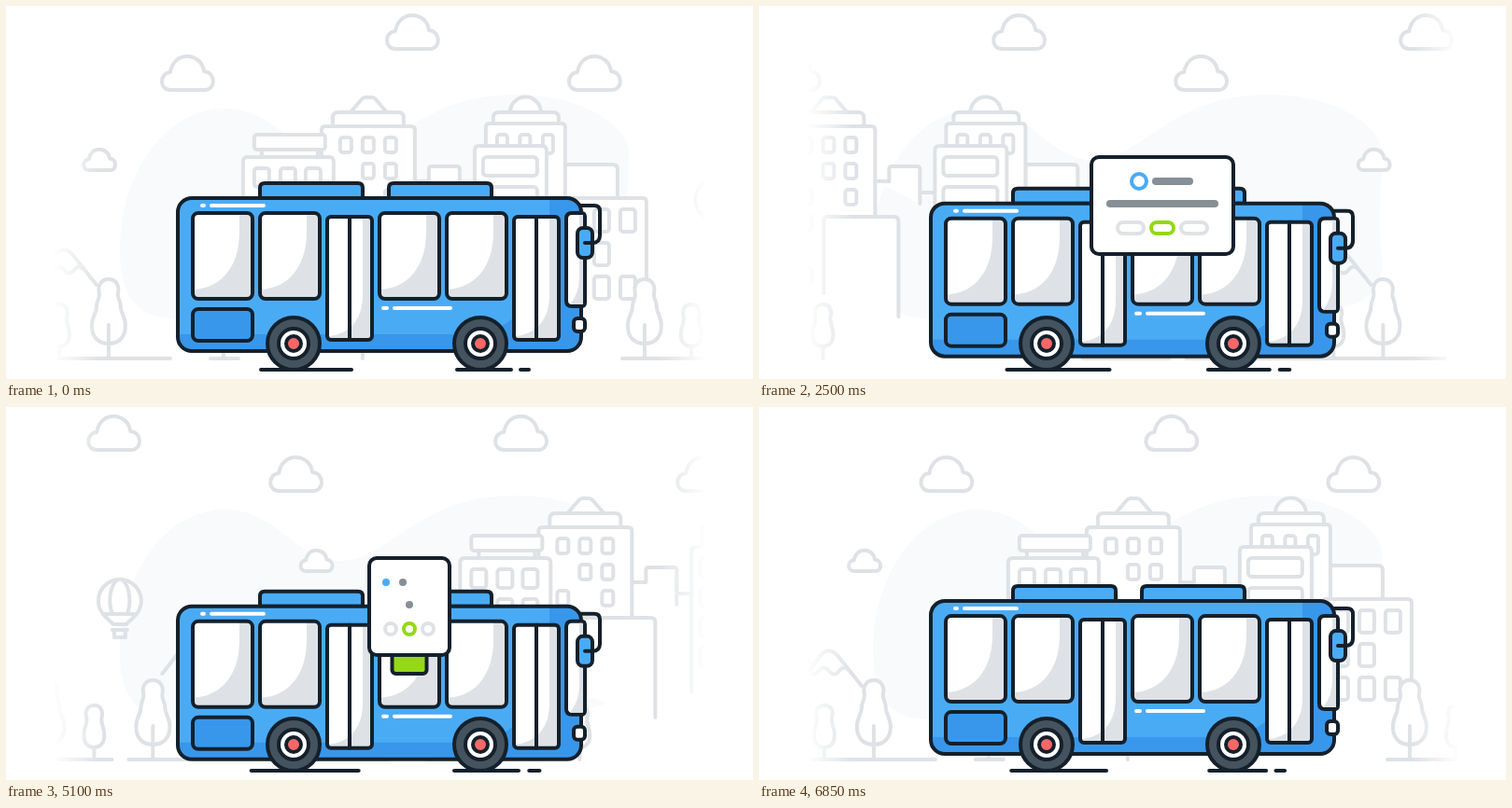
Write an HTML page that moves like this. It is 800 px wide and 400 px high and loops after 6900 ms.

```html
<!DOCTYPE html>
<html lang="en">
<head>
<meta charset="utf-8">
<title>City bus</title>
<style>
@property --t { syntax: "<number>"; inherits: true; initial-value: 0; }
@property --open { syntax: "<number>"; inherits: true; initial-value: 0; }
@property --drop { syntax: "<number>"; inherits: true; initial-value: 0; }

html, body { margin: 0; width: 100%; height: 100%; overflow: hidden; background: #fff; }
svg {
  display: block; width: 800px; height: 400px;
  --bounce: calc(.5 - .5 * cos(var(--t) * .011766));
  animation: clock 6.9s linear infinite;
}
@keyframes clock { from { --t: 0; } to { --t: 6900; } }

.far, .near { fill: #fff; stroke: #dee2e6; stroke-width: 4; stroke-linecap: round; stroke-linejoin: round; }
.far { transform: translateX(calc(var(--t) * -.0627px)); }
.near { transform: translateX(calc(var(--t) * -.1254px)); }
.line { fill: none; }
#cloud { vector-effect: non-scaling-stroke; }

.ink { stroke: #14202b; stroke-width: 4; stroke-linecap: round; stroke-linejoin: round; }
.bus { transform: translateY(calc(var(--bounce) * 8px)); }
.sky { fill: #4aabf5; }
.deep { fill: #3897eb; }
.shade { fill: #dee2e6; stroke: none; }
.shine { fill: none; stroke: #fff; }
.road { transform: scaleX(calc(1 + var(--bounce) * .185)); }

.card {
  transform-origin: 432px 214px;
  animation: pop 6.9s infinite, widen 6.9s infinite, reveal 6.9s infinite;
}
@keyframes pop {
  0%, 8% { transform: scale(0); animation-timing-function: ease-out; }
  12%, 75% { transform: scale(1); animation-timing-function: ease-in; }
  79%, 100% { transform: scale(0); }
}
@keyframes widen {
  0%, 12% { --open: 0; animation-timing-function: ease-in-out; }
  17%, 69% { --open: 1; animation-timing-function: ease-in-out; }
  73.8%, 100% { --open: 0; }
}
@keyframes reveal {
  0%, 37% { --drop: 0; animation-timing-function: ease-in-out; }
  41%, 74% { --drop: 1; animation-timing-function: ease-in-out; }
  76%, 100% { --drop: 0; }
}
.mid { --w: calc(var(--min) + var(--open) * (var(--max) - var(--min))); width: calc(var(--w) * 1px); x: calc(432px - var(--w) * .5px); }
.panel { --min: 86; --max: 152; fill: #fff; }
.ticket { --min: 37; --max: 127; fill: #94d816; transform: translateY(calc((var(--drop) - 1) * 24px)); }
.bar { fill: #868e96; }
.title { width: calc(8px + var(--open) * 36px); }
.text { --min: 8; --max: 120; }
.dot { fill: #fff; stroke: #4aabf5; stroke-width: 4; r: calc(2px + var(--open) * 6px); }
.pill { fill: #fff; stroke: #dee2e6; stroke-width: 4; }
.left { x: calc(406px - var(--open) * 22px); width: calc(12px + var(--open) * 16px); }
.right { x: calc(446px + var(--open) * 6px); width: calc(12px + var(--open) * 16px); }
.pick { --min: 12; --max: 24; animation: pick 6.9s infinite; }
@keyframes pick {
  0%, 33% { stroke: #dee2e6; }
  36%, 100% { stroke: #94d816; }
}
</style>
</head>
<body>
<svg viewBox="0 0 800 400">
  <defs>
    <linearGradient id="fade">
      <stop offset=".5" stop-color="#fff"/>
      <stop offset="1" stop-color="#fff" stop-opacity="0"/>
    </linearGradient>

    <path id="cloud" d="M-18 0C-30 0-30-18-18-19C-16-30-9-36 0-36C11-36 17-28 18-20C31-19 31 0 19 0Z"/>
    <g id="clouds"><use href="#cloud" x="-1" y="46"/><use href="#cloud" x="194" y="90"/></g>

    <rect id="winA" x="-8" y="-10" width="16" height="20" rx="3"/>
    <rect id="winB" x="-6" y="-8" width="12" height="16" rx="3"/>
    <rect id="winF" x="-8" y="-12" width="16" height="24" rx="3"/>
    <rect id="slot" x="511" width="58" height="20" rx="4"/>

    <g id="bush">
      <path d="M0 320C8 320 10 327 8 334C7 340 11 343 11 352C11 360 7 365 0 365C-7 365-11 360-11 352C-11 343-7 340-8 334C-10 327-8 320 0 320Z"/>
      <path d="M0 365V378"/>
    </g>
    <g id="tree">
      <path d="M0 293C8 293 12 300 10 308C9 313 13 316 13 323C13 329 18 333 18 343C18 355 11 362 0 362C-11 362-18 355-18 343C-18 333-13 329-13 323C-13 316-9 313-10 308C-12 300-8 293 0 293Z"/>
      <path d="M0 342V378"/>
    </g>

    <g id="city">
      <!-- mountains -->
      <path class="line" d="M807 286L855 224Q867 210 880 224L914 275M833 255q5.5 8 11 0t11 0t11 0t11 0t11 0t11 0"/>
      <path class="line" d="M843 378L921 272Q933 252 946 270L969 299M912 283q5.5 7 11 0t11 0t11 0t11 0"/>

      <!-- domed tower and its neighbour -->
      <path d="M599 215V170H650q5 0 5 5V215"/>
      <path d="M540 114A16.500 16.500 0 0 1 573 114"/>
      <path d="M522 126V120q0-6 6-6h58q6 0 6 6v6"/>
      <path d="M514 215V130q0-4 4-4h77q4 0 4 4V215"/>
      <rect x="526" y="138" width="11" height="20" rx="3"/>
      <rect x="550.500" y="138" width="11" height="20" rx="3"/>
      <rect x="575" y="138" width="11" height="20" rx="3"/>
      <path d="M591 362V210q0-4 4-4h87q4 0 4 4V300"/>
      <use href="#winF" x="610" y="230"/><use href="#winF" x="638" y="230"/><use href="#winF" x="666" y="230"/>
      <use href="#winF" x="610" y="266"/><use href="#winF" x="638" y="266"/>
      <use href="#winF" x="610" y="302"/><use href="#winF" x="638" y="302"/><use href="#winF" x="666" y="302"/>
      <path class="line" d="M486 200H502"/>
      <path d="M502 305V155q0-5 5-5h67q5 0 5 5V327"/>
      <use href="#slot" y="162"/><use href="#slot" y="194"/><use href="#slot" y="226"/><use href="#slot" y="258"/>

      <!-- gabled block -->
      <path d="M438 188H453V175q0-3 3-3h27q3 0 3 3V212"/>
      <path d="M369 114L381 100q2-2 4-2h7q2 0 4 2L408 114"/>
      <path d="M350 129V120q0-6 6-6h64q6 0 6 6v9"/>
      <path d="M338 250V133q0-4 4-4h92q4 0 4 4V250"/>
      <use href="#winB" x="364" y="149"/><use href="#winB" x="388" y="149"/><use href="#winB" x="412" y="149"/>
      <use href="#winB" x="388" y="177"/><use href="#winB" x="412" y="177"/>
      <use href="#winB" x="364" y="205"/><use href="#winB" x="412" y="205"/>
      <use href="#winB" x="364" y="233"/><use href="#winB" x="364" y="289"/>
      <path d="M383 308V231q0-5 5-5h70q5 0 5 5V333"/>

      <!-- flat block -->
      <path d="M239 305V218q0-4 4-4h11"/>
      <path d="M274 162V154H334V162"/>
      <rect x="266" y="138" width="76" height="16" rx="3"/>
      <path d="M254 315V167q0-5 5-5h87q5 0 5 5V367"/>
      <use href="#winA" x="274" y="184"/><use href="#winA" x="302" y="184"/><use href="#winA" x="329" y="184"/>
      <use href="#winA" x="302" y="216"/><use href="#winA" x="329" y="216"/>
      <use href="#winA" x="274" y="248"/><use href="#winA" x="302" y="248"/>
      <use href="#winA" x="302" y="280"/>

      <!-- ground and trees -->
      <path d="M660 378H753M771 378H1048M219 378H249"/>
      <use href="#bush" x="233"/><use href="#bush" x="382"/><use href="#bush" x="734"/><use href="#bush" x="929"/>
      <use href="#tree" x="684"/><use href="#tree" x="797"/><use href="#tree" x="982"/>

      <!-- balloon and low cloud -->
      <g transform="translate(761.500 0)">
        <path d="M-7 233C-14 226-23 220-23 208A23 23 0 1 1 23 208C23 220 14 226 7 233Z"/>
        <path class="line" d="M-3 185C-12 195-12 211-8 222M3 185C12 195 12 211 8 222M-18 222H18M-8 239H8M-6 239V247H6V239"/>
      </g>
      <use href="#cloud" transform="translate(972 176) scale(.62)"/>
    </g>

    <g id="pane">
      <rect width="64" height="92" rx="6" fill="#fff" stroke="none"/>
      <path class="shade" d="M50 0V20C50 58 30 81 0 82V86q0 6 6 6H58q6 0 6-6V6q0-6-6-6Z"/>
      <rect width="64" height="92" rx="6" fill="none"/>
    </g>
    <g id="door">
      <rect width="48" height="132" rx="4" fill="#fff" stroke="none"/>
      <path class="shade" d="M38 0V84C38 110 24 127 0 128q0 4 4 4H44q4 0 4-4V4q0-4-4-4Z"/>
      <rect width="48" height="132" rx="4" fill="none"/>
      <path d="M24 0V132"/>
    </g>
    <g id="wheel">
      <circle r="28" fill="#45535f"/>
      <circle r="16" fill="#fff"/>
      <circle r="8" fill="#f66868"/>
    </g>
  </defs>

  <path fill="#f8fafc" d="M122 262C122 180 170 110 235 110C290 110 310 165 358 165C410 165 440 95 545 95C620 95 668 130 667 158C666 200 662 230 667 270C670 305 650 322 610 325L180 335C140 335 122 310 122 262Z"/>

  <g class="far">
    <use href="#clouds"/><use href="#clouds" x="436"/><use href="#clouds" x="872"/>
  </g>
  <g class="near">
    <use href="#city" x="-872"/><use href="#city"/><use href="#city" x="872"/>
  </g>
  <rect width="100" height="400" fill="url(#fade)"/>
  <rect width="100" height="400" fill="url(#fade)" transform="translate(800 0) scale(-1 1)"/>

  <g class="ink">
    <path class="road" style="transform-origin:329px 390px" d="M273 390H370"/>
    <path class="road" style="transform-origin:498px 390px" d="M483 390H541M551 390H560"/>

    <g class="bus">
      <path class="sky" d="M272 206V195q0-5 5-5H377q5 0 5 5V206ZM410 206V195q0-5 5-5H515q5 0 5 5V206Z"/>
      <path fill="none" d="M614 214H630q6 0 6 6V246q0 8-8 8H620"/>
      <rect class="sky" x="184" y="206" width="432" height="164" rx="15" stroke="none"/>
      <path class="deep" stroke="none" d="M184 352H500C550 348 582 300 582 240V206H601q15 0 15 15V355q0 15-15 15H199q-15 0-15-15Z"/>
      <rect x="184" y="206" width="432" height="164" rx="15" fill="none"/>
      <path class="shine" d="M210 214H212M220 214H276M404 324H408M416 324H476"/>

      <use href="#pane" x="200" y="222"/><use href="#pane" x="272" y="222"/>
      <use href="#pane" x="400" y="222"/><use href="#pane" x="472" y="222"/>
      <use href="#door" x="344" y="226"/><use href="#door" x="544" y="226"/>
      <rect class="deep" x="200" y="325" width="64" height="34" rx="6"/>

      <path fill="#fff" d="M606 222H616q4 0 4 4V318q0 4-4 4H606q-6 0-6-6V228q0-6 6-6Z"/>
      <path class="shade" d="M614 224H618V320H604Q614 308 614 290Z"/>
      <rect x="608" y="335" width="12" height="14" rx="4" fill="#fff"/>
      <rect class="sky" x="612" y="238" width="16" height="32" rx="6"/>
      <path d="M620 254H628"/>
    </g>

    <use href="#wheel" x="308" y="362"/><use href="#wheel" x="508" y="362"/>
  </g>

  <g class="card">
    <rect class="ink mid ticket" y="256" height="30" rx="4"/>
    <rect class="ink mid panel" y="162" height="104" rx="8"/>
    <circle class="dot" cx="407" cy="188"/>
    <rect class="bar title" x="421" y="184" height="8" rx="4"/>
    <rect class="bar mid text" y="208" height="8" rx="4"/>
    <rect class="pill left" y="232" height="12" rx="6"/>
    <rect class="pill mid pick" y="232" height="12" rx="6"/>
    <rect class="pill right" y="232" height="12" rx="6"/>
  </g>
</svg>
</body>
</html>
```
